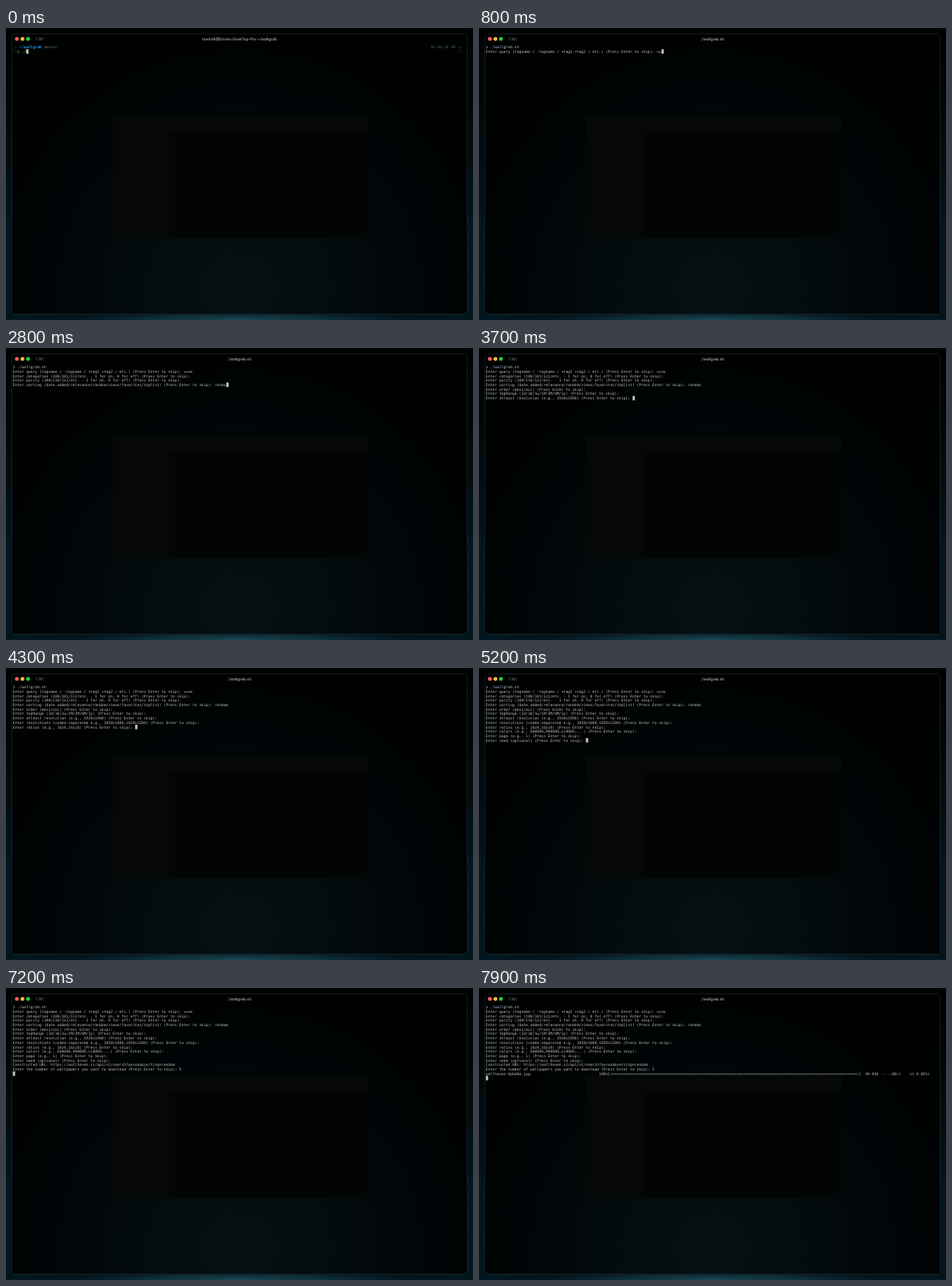
Write an HTML page that moves like this. It is 600 by 375 pixels and loops after 8000 ms.

```html
<!DOCTYPE html>
<html lang="en">
<head>
<meta charset="utf-8">
<title>Terminal session</title>
<style>
  html, body { margin: 0; width: 100%; height: 100%; overflow: hidden; background: #000; }
  svg { display: block; width: 100vw; height: 100vh; }
  text { white-space: pre; text-rendering: geometricPrecision; }
  .mono { font: 4.745px "DejaVu Sans Mono", "Liberation Mono", monospace; fill: #bcbebe; }
  .ui { font: 600 4.8px Inter, "Liberation Sans", sans-serif; fill: #a2a5a6; }
</style>
</head>
<body>
<svg viewBox="0 0 600 375" preserveAspectRatio="none">
  <defs>
    <linearGradient id="desk" x2="0" y2="1">
      <stop offset="0" stop-color="#000101"/>
      <stop offset=".25" stop-color="#010609"/>
      <stop offset=".7" stop-color="#02151e"/>
      <stop offset="1" stop-color="#02161f"/>
    </linearGradient>
    <radialGradient id="horizon">
      <stop offset="0" stop-color="#1b4a57"/>
      <stop offset="1" stop-color="#1b4a57" stop-opacity="0"/>
    </radialGradient>
    <radialGradient id="glow" gradientUnits="userSpaceOnUse" cx="300" cy="335" r="320">
      <stop offset="0" stop-color="#061013"/>
      <stop offset=".4" stop-color="#030b0e"/>
      <stop offset=".75" stop-color="#010507"/>
      <stop offset="1" stop-color="#000202"/>
    </radialGradient>
  </defs>

  <rect width="600" height="375" fill="url(#desk)"/>
  <ellipse cx="300" cy="376" rx="215" ry="13" fill="url(#horizon)"/>
  <rect x="7.5" y="7.5" width="585" height="360" rx="3.5" fill="url(#glow)" stroke="#22292b" stroke-width=".7"/>
  <rect x="137" y="112.5" width="329" height="157" rx="2" fill="#060805"/>
  <path d="M210 132H466V267.5a2 2 0 0 1-2 2H210Z" fill="#030504"/>

  <circle cx="14" cy="14" r="2.5" fill="#fb5f57"/>
  <circle cx="21.1" cy="14" r="2.5" fill="#f9bc2e"/>
  <circle cx="28.2" cy="14" r="2.5" fill="#2bc840"/>
  <text x="37" y="15.7" class="ui" style="font:4.7px Inter,'DejaVu Sans',sans-serif;fill:#777b7c">⌥⌘1</text>
  <text id="title" x="300" y="15.7" class="ui" text-anchor="middle"></text>

  <g id="screen" class="mono"></g>
  <rect id="cursor" width="2.9" height="5.7" fill="#c4c6c6"/>
</svg>
<script>
const LOOP = 8000, LEFT = 8.8, COL = 2.857, BASE = 26.2, ROW = 5.7;
const GREY = "#bcbebe", FRAME = "#454848", GREEN = "#8fae55";
const screen = document.getElementById("screen");
const title = document.getElementById("title");
const cursor = document.getElementById("cursor");

const ask = (what, hint = "") => `Enter ${what}${hint && ` (${hint})`} (Press Enter to skip): `;
const bits = "1 for on, 0 for off";

// Command line before Enter: [ms, typed so far]
const typing = [[0, "./"], [100, "./w"], [200, "./wallgrab.sh"]];

// Terminal output after Enter: [ms, appended text]
const output = [
  [400, "❯ ./wallgrab.sh\n"],
  [500, ask("query", "tagname / -tagname / +tag1 +tag2 / etc.")],
  [700, "v"], [800, "u"], [900, "n"], [1100, "o"],
  [1300, "\n" + ask("categories", "100/101/111/etc. - " + bits)],
  [1500, "\n" + ask("purity", "100/110/111/etc. - " + bits)],
  [1900, "\n" + ask("sorting", "date_added/relevance/random/views/favorites/toplist")],
  ...[..."random"].map((key, i) => [2400 + i * 100, key]),
  [3100, "\n" + ask("order", "desc/asc")],
  [3300, "\n" + ask("topRange", "1d/3d/1w/1M/3M/6M/1y")],
  [3700, "\n" + ask("atleast resolution", "e.g., 1920x1080")],
  [3900, "\n" + ask("resolutions", "comma-separated e.g., 1920x1080,1920x1200")],
  [4200, "\n" + ask("ratios", "e.g., 16x9,16x10")],
  [4500, "\n" + ask("colors", "e.g., 660000,990000,cc0000,...")],
  [4800, "\n" + ask("page", "e.g., 1")],
  [5200, "\n" + ask("seed", "optional")],
  [5700, "\nConstructed URL: https://wallhaven.cc/api/v1/search?q=vuno&sorting=random\n"],
  [6600, ask("the number of wallpapers you want to download")],
  [7000, "5"],
  [7200, "\n"],
  [7900, "wallhaven-0pkd6m.jpg".padEnd(51) + "100%[" + "=".repeat(111) +
    ">]  49.93K  --.-KB/s    in 0.001s\n"],
];

function put(row, col, str, fill = GREY, weight = 400) {
  const el = document.createElementNS("http://www.w3.org/2000/svg", "text");
  el.setAttribute("x", LEFT + col * COL);
  el.setAttribute("y", BASE + row * ROW);
  el.style.fill = fill;
  el.style.fontWeight = weight;
  el.textContent = str;
  screen.append(el);
}

function moveCursor(row, col) {
  cursor.setAttribute("x", LEFT + col * COL);
  cursor.setAttribute("y", BASE + row * ROW - 4.6);
}

function drawPrompt(t) {
  const cmd = typing.filter(([ms]) => ms <= t).pop()[1];
  title.textContent = "tovik38@Dorels-DeskTop-Pro:~/wallgrab";
  put(0, 0, "╭─", FRAME);
  put(0, 3, "~/wallgrab", "#1a9fe8", 700);
  put(0, 14, "master", "#5a7b58");
  put(0, 188, "01:09:16 AM", "#496665");
  put(0, 200, "─╮", FRAME);
  put(1, 0, "╰─", FRAME);
  put(1, 2, "❯", GREEN);
  put(1, 4, cmd, GREEN);
  put(1, 200, "─╯", FRAME);
  moveCursor(1, 4 + cmd.length);
}

function drawOutput(t) {
  const lines = output.filter(([ms]) => ms <= t).map(([, str]) => str).join("").split("\n");
  title.textContent = "./wallgrab.sh";
  lines.forEach((line, row) => put(row, 0, line));
  moveCursor(lines.length - 1, lines[lines.length - 1].length);
}

let shown = -1;
function render(t) {
  const step = Math.floor(t / 100);
  if (step === shown) return;
  shown = step;
  screen.replaceChildren();
  (t < output[0][0] ? drawPrompt : drawOutput)(t);
}

const start = performance.now();
function tick() {
  render((performance.now() - start) % LOOP);
  requestAnimationFrame(tick);
}
tick();
</script>
</body>
</html>
```
